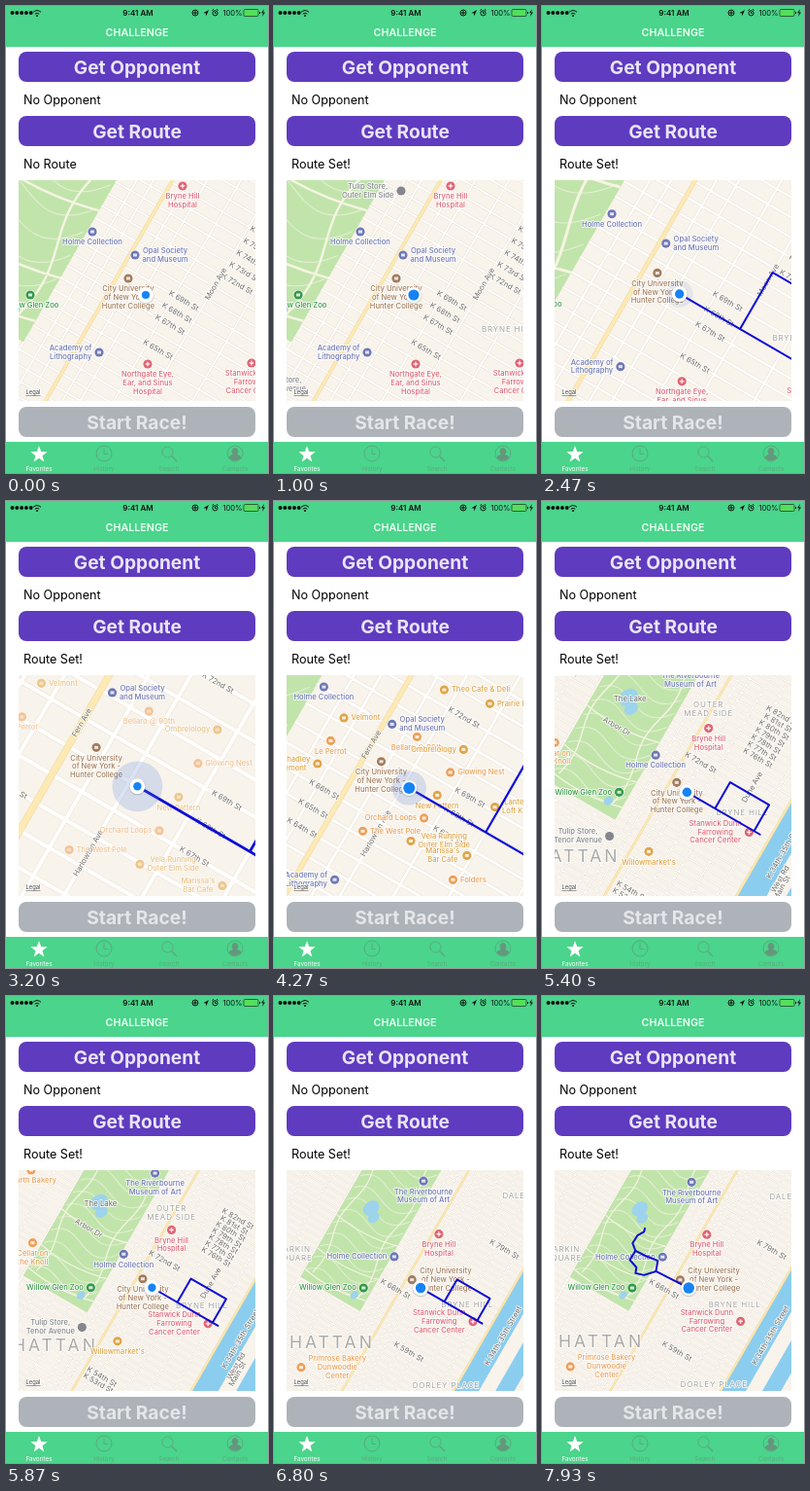
An HTML page with a canvas for the animation above (8 s loop, 270 px wide and 480 px high).

```html
<!DOCTYPE html>
<html lang="en">
<head>
<meta charset="utf-8">
<title>Challenge</title>
<style>
html, body { margin: 0; width: 100%; height: 100%; overflow: hidden; background: #fff; }
svg, canvas { position: absolute; left: 0; top: 0; width: 270px; height: 480px; }
canvas { left: 13px; top: 179px; width: 244px; height: 227px; }
text { font-family: Inter, "Open Sans", sans-serif; text-anchor: middle; }
.btn { font-size: 19.2px; font-weight: 650; fill: #e9e4f6; }
.info { font-size: 12.6px; text-anchor: start; fill: #000; }
.tab { font-size: 6.3px; }
</style>
</head>
<body>
<svg viewBox="0 0 270 480">
  <rect width="270" height="42" fill="#4bd48b"/>
  <rect y="448" width="270" height="32" fill="#4bd48b"/>
  <g fill="#111">
    <path d="M6.500 7h19.500" stroke="#111" stroke-width="4" stroke-linecap="round" stroke-dasharray="0 4.800"/>
    <text x="136" y="10" font-size="8" font-weight="600">9:41 AM</text>
    <text x="233.5" y="10" font-size="7.6">100%</text>
    <path d="M203.500 7.300L209 4L206.300 10.500L206 7.500ZM261 6h1v2h-1z"/>
    <path d="M266 3l-3 4.300h2l-1 3.700 3-4.600h-2z"/>
    <circle cx="32" cy="10" r="1"/>
  </g>
  <g fill="none" stroke="#111">
    <path d="M28 6.300Q32 2.800 36 6.300M29.700 8.200Q32 6.200 34.300 8.200"/>
    <circle cx="195" cy="7" r="3"/><path d="M194 6h2v2h-2z"/>
    <circle cx="215.500" cy="7.300" r="2.600"/><path d="M215.500 5.700v1.800h1.200M212.500 4.500l1.500-1.200M218.500 4.500l-1.500-1.200"/>
    <rect x="245" y="3.500" width="15" height="7" rx="1.200" stroke-width=".6" fill="#55de5c"/>
  </g>
  <text x="135" y="31.300" font-size="10.700" font-weight="600" fill="#effff5">CHALLENGE</text>
  <g fill="#5e3bbf"><rect x="13" y="47" width="244" height="31" rx="8"/><rect x="13" y="113" width="244" height="31" rx="8"/></g>
  <rect x="13" y="412" width="244" height="31" rx="8" fill="#aeb3b9"/>
  <text class="btn" x="135" y="69.500">Get Opponent</text>
  <text class="btn" x="135" y="135.500">Get Route</text>
  <text class="btn" x="135" y="434.500" style="fill:#e4e6e9">Start Race!</text>
  <text class="info" x="18" y="100.500">No Opponent</text>
  <text class="info" x="18" y="166.500" id="status">No Route</text>
  <path fill="#fff" d="M34 452l2.200 6.100 6.400.2-5.100 3.900 1.800 6.200-5.300-3.600-5.300 3.600 1.800-6.200-5.100-3.900 6.400-.2z"/>
  <g fill="none" stroke="#5aaa80">
    <circle cx="101" cy="460" r="8"/><path d="M101 454.500v6h4"/>
    <circle cx="166.500" cy="458.500" r="5.500"/><path d="M170.500 462.500l5.500 5.500" stroke-width="1.600"/>
    <circle cx="236" cy="460" r="8"/>
  </g>
  <path fill="#64977c" d="M236 454a3.600 3.900 0 0 1 2 7q4 1 4.300 3.200a8 8 0 0 1-12.600 0q.3-2.200 4.300-3.200a3.600 3.900 0 0 1 2-7z"/>
  <g class="tab" fill="#5aaa80"><text x="34" y="477.500" fill="#fff">Favorites</text><text x="101" y="477.500">History</text><text x="168" y="477.500">Search</text><text x="236" y="477.500">Contacts</text></g>
</svg>
<canvas id="map"></canvas>
<script>
const LOOP = 8000, TILT = Math.PI / 6, BLOCK = 14.2, FAMILY = ' Inter, "Open Sans", sans-serif';
const cos = Math.cos(TILT), sin = Math.sin(TILT);
const map = document.getElementById('map'), status = document.getElementById('status');
const c = map.getContext('2d'), ratio = Math.max(1, devicePixelRatio || 1);
map.width = 244 * ratio;
map.height = 227 * ratio;

const clamp = x => Math.max(0, Math.min(1, x));
const streetV = n => (68 - n) * BLOCK;

// Pinch gesture: time and zoom; the dot drifts with the zoom
const pinch = [[0, 1], [2270, 1], [3000, 2.35], [3750, 2.35], [4270, 1.6], [4730, .84], [5150, .62], [5870, .53], [6930, .49], [LOOP, .49]];
function view(t) {
  const i = pinch.findIndex(k => k[0] > t), [t0, s0] = pinch[i - 1], [t1, s1] = pinch[i];
  const s = s0 * (s1 / s0) ** ((t - t0) / (t1 - t0)), octave = Math.log2(s);
  return { t, s, x: 144 - 7 * octave, y: 297 - 3 * octave };
}

// Zoom bands, close to far; a label lists its side in each: b, l, r, t, c (no icon) or - (hidden)
const edges = [1.3, .9, .65, .5];
function bandWeights(s) {
  const open = edges.map(e => clamp((s - e) / .03));
  return [...open, 1].map((w, i) => w - (open[i - 1] || 0));
}
const visible = (sides, side, weights) => weights.reduce((sum, w, i) => sum + (sides[i] === side ? w : 0), 0);

const ink = {
  museum: '#6f78b5', health: '#dd6574', school: '#a27c5c', zoo: '#35994a',
  food: '#eca05a', shop: '#dfa548', store: '#85878c', area: '#a3a3a0', park: '#6cab64'
};
const born = { store: 70, area: 70, food: 2900, shop: 2900 };

const places = [
  ['Bryne Hill|Hospital', 'health', 38, -112, '-bbbb'],
  ['Holme Collection', 'museum', -55, -65, 'bbbbl'],
  ['Opal Society|and Museum', 'museum', -11, -41, 'rrr--'],
  ['City University|of New York -|Hunter College', 'school', -18, -17, 'bbbbr'],
  ['Academy of|Lithography', 'museum', -48, 59, 'lll--'],
  ['Northgate Eye,|Ear, and Sinus|Hospital', 'health', 2, 71, '-bb--'],
  ['Stanwick Dunn|Farrowing|Cancer Center', 'health', 109, 70, '-bbll'],
  ['Willow Glen Zoo', 'zoo', -119, 0, '-bbll'],
  ['Tulip Store,|Outer Elm Side', 'store', -13, -107, '-l---'],
  ['Tulip Store,|Tenor Avenue', 'store', -136, 77, '-b-l-'],
  ["Willowmarket's", 'shop', -67, 104, '--bb-'],
  ['The Riverbourne|Museum of Art', 'museum', 6, -222, '---bb'],
  ['Primrose Bakery|Dunwoodie|Center', 'food', -249, 165, '----r'],
  ['Cellar on|the Knoll', 'food', -232, -87, '---b-'],
  ['Hearth Bakery', 'food', -235, -228, '---b-'],
  ['BRYNE HILL', 'area', 97, 36, '-cccc'],
  ['OUTER|MEAD SIDE', 'area', 38, -145, '---c-'],
  ['DALEVILLE', 'area', 220, -190, '----c'],
  ['DORLEY PLACE', 'area', 53, 204, '----c'],
  ['LARKIN|SQUARE', 'area', -263, -71, '----c'],
  ['Willow Glen', 'park', -37, -136, '--c--'],
  ['Hazy Fields', 'park', -142, -136, '--c--']
];

// Shops stand evenly along four avenues: across, first, spacing
const rows = [
  [-59, -18, 17, ['Velmont', 'Le Perrot', 'june hadley|dalemont']],
  [-12, -66, 35, ['Theo Cafe & Deli', 'Bellaro @ 90th', '', 'The West Pole']],
  [18, -73, 17, ['Prairie BBQ', '', 'Ombrelology', 'Glowing Nest', 'New Pattern', 'Orchard Loops', 'Vela Running|Outer Elm Side']],
  [54, -17, 18, ['Lantern|Loft Kids', '', "Marissa's|Bar Cafe", 'Folders']]
];
for (const [u, first, step, names] of rows) names.forEach((name, i) => {
  const v = first + i * step;
  if (name) places.push([name, i % 2 ? 'food' : 'shop', u * cos - v * sin, u * sin + v * cos, 'rbl'[i % 3] + '----']);
});

// Runs of numbered streets: first, last, place along the street, bands
const runs = [
  [67, 69, 37, 'ccc--'], [64, 66, -47, 'c----'], [72, 72, 8, 'c----'], [65, 65, 39, '-cc--'], [72, 76, 76, '-cc--'],
  [61, 63, 18, '--c--'], [76, 82, 78, '---c-'], [53, 54, 2, '---c-'], [72, 72, -5, '---c-'],
  [79, 79, 111, '----c'], [66, 66, -44, '----c'], [59, 59, 45, '----c']
];
// Names running along the avenues: across, along, bands
const avenues = [
  ['Fern Ave', -35, -12, 'c----'], ['Harlowton Ave', -4, 36, 'c----'], ['Moon Ave', 57, -46, '-cc--'],
  ['Dune Ave', 95, -65, '--cc-'], ['East Dr', -107, 3, '--c--'], ['K 34th-35th Street', 199, 0, '---cc'],
  ['West Rd', 218, 50, '---c-'], ['Main St', 228, 62, '---c-']
];

function addLine(path, ...pts) {
  pts.forEach((p, i) => path[i ? 'lineTo' : 'moveTo'](...p));
  return path;
}
const EAST = -85, WEST = -230, SOUTH = 105, SHORE = 166, FAR = 500;

const roads = new Path2D();
for (let n = 36; n < 100; n++) {
  const v = streetV(n), besidePark = v < SOUTH;
  addLine(roads, [-FAR, v], [besidePark ? WEST : EAST, v]);
  addLine(roads, [EAST, v], [SHORE, v]);
}
for (const u of [-67, -52, -20, -4, 26, 57, 96, 136]) addLine(roads, [u, -FAR], [u, FAR]);
for (let u = WEST; u > -FAR; u -= 48) addLine(roads, [u, -FAR], [u, FAR]);
for (let u = EAST; u > WEST; u -= 36) addLine(roads, [u, SOUTH], [u, FAR]);
const mainRoads = addLine(addLine(new Path2D(), [-35, -FAR], [-35, FAR]), [SHORE, -FAR], [SHORE, FAR]);

const drives = new Path2D(), paths = new Path2D();
for (const u of [EAST - 20, WEST + 18])
  for (let v = -FAR; v < 92; v += 8) drives[v > -FAR ? 'lineTo' : 'moveTo'](u + 7 * Math.sin(v / 28), v);
for (const v of [-45, 35, 86]) {
  drives.moveTo(WEST, v);
  drives.quadraticCurveTo(-160, v + 14, EAST, v - 6);
}
for (let v = 85; v > -FAR; v -= 28) {
  paths.moveTo(WEST + 5, v);
  paths.bezierCurveTo(-180, v - 50, -140, v + 45, EAST - 3, v - 25);
}

function stroke(path, color, width) {
  c.strokeStyle = color;
  c.lineWidth = width;
  c.stroke(path);
}
function strip(color, u1, u2, bottom = 900) {
  c.fillStyle = color;
  c.fillRect(u1, -900, u2 - u1, bottom + 900);
}
function ground(s) {
  strip('#f8f3eb', -900, 900);
  strip('#8bcdef', SHORE, SHORE + 46);
  strip('#8bcdef', SHORE + 76, SHORE + 110);
  strip('#c1e4ab', WEST, EAST, SOUTH);
  stroke(paths, '#e4f0d2', 1 / s);
  stroke(drives, '#f6f4e2', 2.4);
  c.fillStyle = '#9dd3ec';
  for (const [u, v, size] of [[-172, -92, 14], [-158, -78, 10], [-112, 82, 7]]) {
    c.beginPath();
    c.ellipse(u, v, size, size * 1.3, .4, 0, 7);
    c.fill();
  }
  stroke(roads, '#e9e1d7', 1.8 + 1 / s);
  stroke(roads, '#fffefc', 1.8);
  stroke(mainRoads, '#eed9a0', 2.8 + 1 / s);
  stroke(mainRoads, '#fde9b4', 2.8);
}

function write(text, x, y, color, font) {
  c.font = font + FAMILY;
  c.strokeStyle = '#fffc';
  c.lineWidth = 1.8;
  c.strokeText(text, x, y);
  c.fillStyle = color;
  c.fillText(text, x, y);
}
function disc(x, y, r, color) {
  c.beginPath();
  c.arc(x, y, r, 0, 7);
  c.fillStyle = color;
  c.fill();
}

function roadName(text, u, v, angle, cam, alpha) {
  if (!alpha) return;
  c.save();
  c.globalAlpha = alpha;
  c.translate(cam.x + cam.s * (u * cos - v * sin), cam.y + cam.s * (u * sin + v * cos));
  c.rotate(angle);
  write(text, 0, 0, '#6f6b65', '7.8px');
  c.restore();
}
const ordinal = n => n + (['th', 'st', 'nd', 'rd'][n % 10] || 'th');

function roadNames(cam, weights) {
  for (const [first, last, u, sides] of runs)
    for (let n = first; n <= last; n++)
      roadName(`K ${ordinal(n)} St`, u, streetV(n), TILT, cam, visible(sides, 'c', weights));
  for (const [text, u, v, sides] of avenues)
    roadName(text, u, v, TILT - Math.PI / 2, cam, visible(sides, 'c', weights));
  roadName('Arbor Dr', -164, -38, TILT, cam, weights[2] + weights[3]);
  roadName('The Lake', -168, -91, 0, cam, weights[3]);
}

function icon(x, y, kind) {
  disc(x, y, 5.2, '#fff');
  disc(x, y, 4.6, ink[kind]);
  if (kind === 'store') return;
  c.fillStyle = '#fffc';
  if (kind === 'health') {
    c.fillRect(x - 2.4, y - .7, 4.8, 1.4);
    c.fillRect(x - .7, y - 2.4, 1.4, 4.8);
  } else c.fillRect(x - 2, y - 1.5, 4, 3);
}
function place([text, kind, px, py, sides], side, cam, weights) {
  const alpha = visible(sides, side, weights) * clamp((cam.t - (born[kind] ?? -500)) / 500);
  if (!alpha) return;
  const x = cam.x + px * cam.s, y = cam.y + py * cam.s, lines = text.split('|');
  const font = kind === 'area' ? '8px' : '500 7.6px';
  c.globalAlpha = alpha;
  c.font = font + FAMILY;
  c.letterSpacing = kind === 'area' ? '.8px' : '0px';
  const reach = Math.max(...lines.map(l => c.measureText(l).width)) / 2 + 7.5;
  const rise = (lines.length - 1) * 4.4;
  const tx = x + ({ l: -reach, r: reach }[side] || 0), ty = y + (side === 'b' ? 11 : -rise);
  lines.forEach((l, i) => write(l, tx, ty + i * 8.8, ink[kind], font));
  c.letterSpacing = '0px';
  if (side !== 'c') icon(x, y, kind);
}

const box = [[0, 0], [148, 0]], loop = [[57, 0], [57, -53], [136, -53], [136, 0]];
const trail = [[0, 0], [-69, -35], [-65, -57], [-90, -67], [-112, -78], [-124, -59], [-110, -43], [-112, -31], [-94, -27], [-69, -35]];
const spur = [[-112, -78], [-118, -94], [-108, -110], [-94, -118], [-92, -125]];
function route({ t, s, x, y }) {
  if (t < 1930) return;
  const inPark = t >= 7270, line = addLine(new Path2D(), ...(inPark ? trail : box));
  if (inPark) addLine(line, ...spur);
  else if (t >= 2270) addLine(line, ...loop);
  c.save();
  c.translate(x, y);
  c.scale(s, s);
  if (!inPark) c.rotate(TILT);
  c.lineJoin = c.lineCap = 'round';
  c.globalAlpha = clamp((t - 1900) / 200);
  stroke(line, '#0c0cd6', (2 + .8 * clamp(s - 1.35)) / s);
  c.restore();
}

function userDot({ t, s, x, y }) {
  c.globalAlpha = clamp((s - 1.1) / .3);
  disc(x, y, 11 * s, 'rgba(70,120,220,.2)');
  c.globalAlpha = 1;
  disc(x, y + .5, 8.6, 'rgba(90,90,100,.25)');
  disc(x, y, 8, '#fff');
  disc(x, y, 5.1 - Math.cos(t / 3000 * 2 * Math.PI), '#1683f5');
}

function draw(t) {
  const cam = view(t), weights = bandWeights(cam.s);
  status.textContent = t < 900 ? 'No Route' : 'Route Set!';
  c.setTransform(ratio, 0, 0, ratio, -13 * ratio, -179 * ratio);
  c.globalAlpha = 1;
  c.textAlign = 'center';
  c.textBaseline = 'middle';
  c.lineJoin = 'round';
  c.save();
  c.translate(cam.x, cam.y);
  c.scale(cam.s, cam.s);
  c.rotate(TILT);
  ground(cam.s);
  c.restore();

  roadNames(cam, weights);
  c.letterSpacing = '3px';
  c.globalAlpha = weights[3] + weights[4];
  write('MANHATTAN', cam.x - 235 * cam.s, cam.y + 114 * cam.s, '#aaa9a5', '17.5px');
  c.letterSpacing = '0px';
  for (const p of places)
    for (const side of 'blrc') place(p, side, cam, weights);
  c.globalAlpha = 1;
  route(cam);
  userDot(cam);
  write('Legal', 28, 397, '#444', '5.8px');
  c.fillRect(20.5, 400.3, 15, .5);
}

function tick() {
  draw(performance.now() % LOOP);
  requestAnimationFrame(tick);
}
tick();
</script>
</body>
</html>
```
